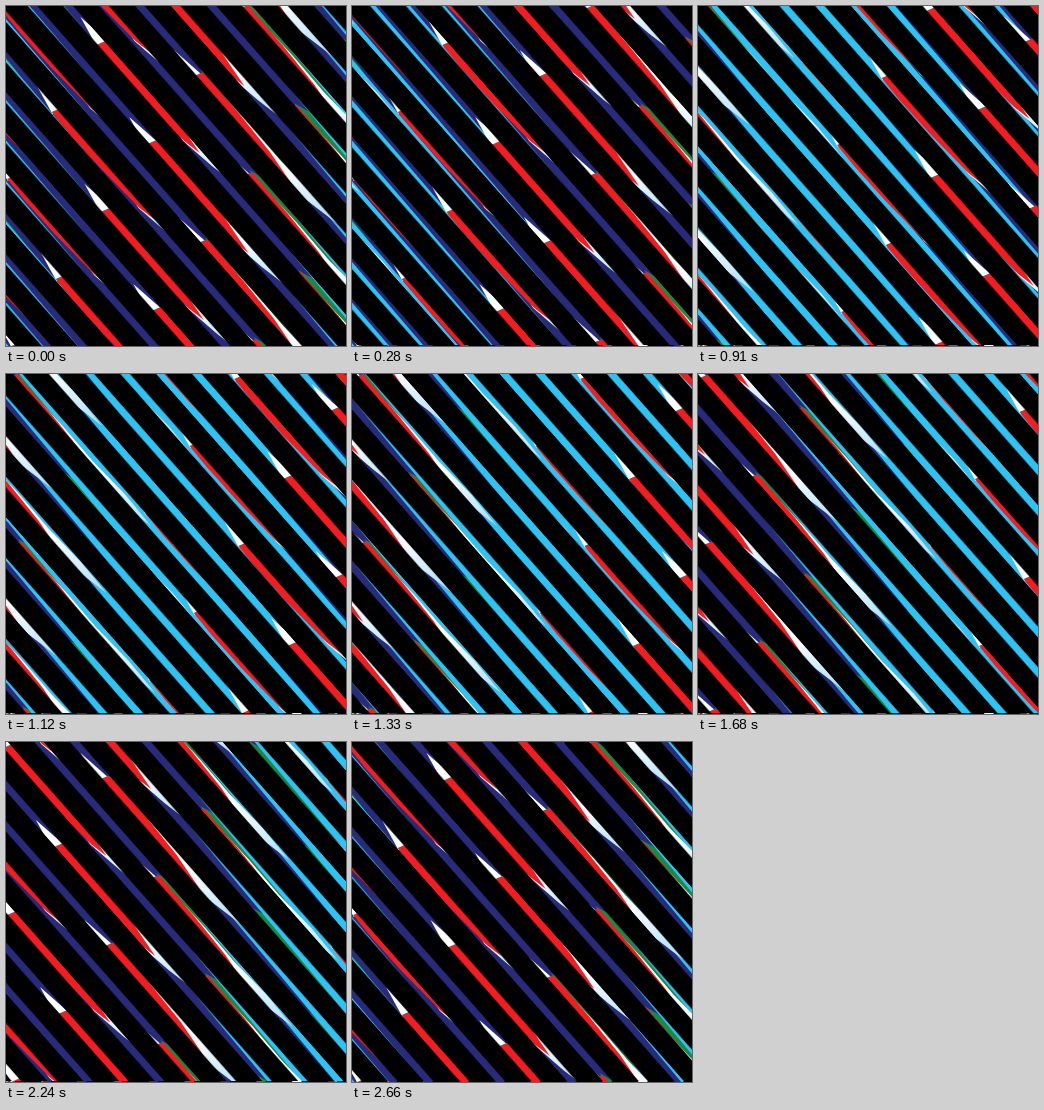
Recreate the animation shown at these times as an HTML page. Size 340 px wide and 340 px high, loop 2.73 s.

```html
<!DOCTYPE html>
<html lang="en">
<head>
<meta charset="utf-8">
<title>Sliding slits</title>
<style>
  html, body { margin: 0; width: 100%; height: 100%; overflow: hidden; background: #000; }
  svg { display: block; width: 100vw; height: 100vh; }
  #grating { animation: slide 2730ms steps(39) infinite; }
  @keyframes slide { to { transform: translateX(-35.8px); } }
</style>
</head>
<body>
<svg viewBox="0 0 340 340">
  <defs>
    <linearGradient id="pale" x1="0" y1="0" x2="0" y2="1">
      <stop offset=".55" stop-color="#fff"/>
      <stop offset="1" stop-color="#a9def6"/>
    </linearGradient>
    <clipPath id="main"><rect width="340" height="339"/></clipPath>
    <clipPath id="edge"><rect y="339" width="340" height="1"/></clipPath>
  </defs>
  <rect width="340" height="340" fill="#282a7c"/>
  <g id="art" transform="matrix(1 0 .884 1 0 0)"></g>
  <g clip-path="url(#main)">
    <g transform="matrix(1 0 .884 1 0 0)"><g id="grating"></g></g>
  </g>
  <g clip-path="url(#edge)">
    <g id="still" transform="matrix(1 0 .884 1 0 0)"></g>
  </g>
</svg>
<script>
  // All shapes live in sheared space: x is the offset along the top edge.
  const PITCH = 35.8, SLIT = 9.4, START = 26.5, SKEW = 0.884;
  const byId = id => document.getElementById(id);

  const poly = (fill, points) => `<polygon fill="${fill}" points="${points.join(' ')}"/>`;

  // Cyan bands lean slightly against the slits.
  function band(k) {
    const base = k * PITCH;
    const side = (offset, drift, y) => [base + offset - drift * (base + 16 + SKEW * y), y];
    return poly('#2fc3f3', [side(14, .06, 0), side(24, .03, 0), side(24, .03, 340), side(14, .06, 340)]);
  }

  // Comet heads sit on a lattice that drifts against the slits from left to right.
  function headAt(k, y) {
    const x = (k * PITCH + 34.5 + SKEW * y) / 1.08;
    return [x - SKEW * y, y];
  }

  const placed = ([x, y], points) => points.map(([u, v]) => [x + u, y + v]);

  const flank = head => poly('#178a45', placed(head,
    [[9, 10], [11, -4], [18, 4], [21, 55], [19, 92], [14, 120], [8, 90]]));

  const body = head =>
    poly('url(#pale)', placed(head,
      [[11, 25], [12, 50], [11, 85], [14, 118], [12, 150], [2, 126], [-5, 100], [2, 70]])) +
    poly('#fff', placed(head, [[2, -24], [8, 0], [-8, 6]])) +
    poly('#f31c20', placed(head,
      [[-7, 4], [12, -2], [11, 40], [8, 78], [1, 112], [-4, 100], [-8, 60], [-8.5, 25]]));

  let bands = '', bars = '';
  const heads = [];
  for (let k = -11; k <= 11; k++) {
    bands += band(k);
    const left = START + k * PITCH + SLIT / 2;
    bars += `<rect x="${left}" y="-2" width="${PITCH - SLIT}" height="344"/>`;
    for (let m = -6; m <= 6; m++) {
      const y = 135 - 100 * k + 233 * m;
      if (y > -160 && y < 370) heads.push(headAt(k, y));
    }
  }
  byId('art').innerHTML = heads.map(flank).join('') + bands + heads.map(body).join('');
  byId('grating').innerHTML = bars;
  byId('still').innerHTML = bars;
</script>
</body>
</html>
```
